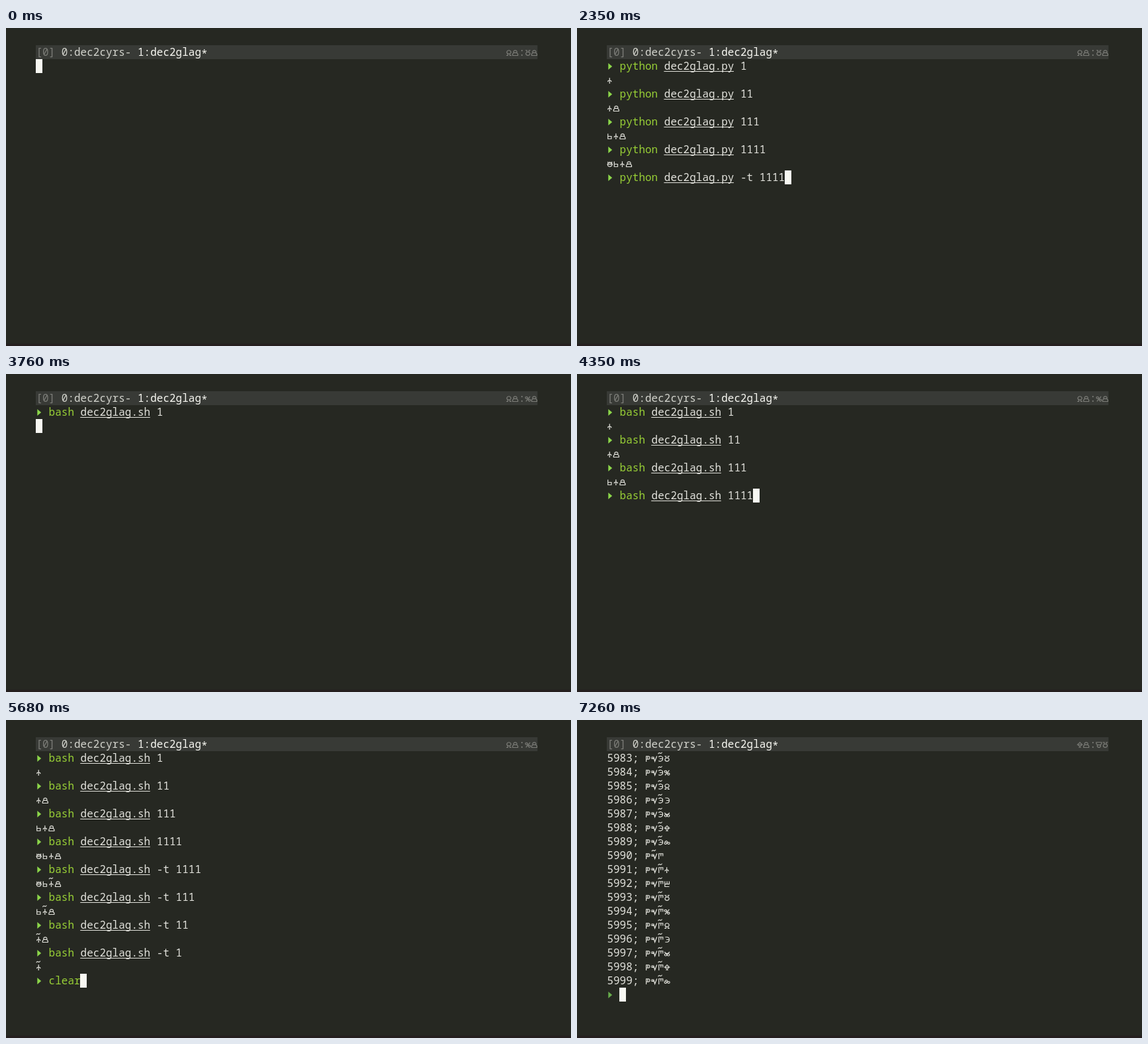
Recreate the animation shown at these times as an HTML page. Size 854x480 px, loop 8.1 s.

```html
<!DOCTYPE html>
<html lang="en">
<head>
<meta charset="utf-8">
<title>dec2glag</title>
<style>
html, body { margin: 0; width: 100%; height: 100%; overflow: hidden; background: #262822; }
svg { display: block; width: 854px; height: 480px; }
text { font: 300 16px "Noto Sans Mono", "Liberation Mono", monospace; white-space: pre; }
</style>
</head>
<body>
<svg id="stage" viewBox="0 0 854 480" xmlns="http://www.w3.org/2000/svg">
  <rect width="854" height="480" fill="#262822"/>
  <rect y="476.5" width="854" height="3.5" fill="#251f1f"/>
  <g id="screen"></g>
</svg>
<script>
const LOOP = 8100, LAST = 87;
const CELL = 9.6, LINE = 21, LEFT = 45, TOP = 26;
const WHITE = '#f8f8f2', TEXT = '#e2e2dc', GREEN = '#98cf36', ARROW = '#8cd64a';
const GREY = '#7c7d78', BACK = '#262822';

const colX = c => LEFT + c * CELL;
const rowY = r => TOP + r * LINE;

// Glagolitic numerals, drawn in an 8 by 9 box
const ring = (x, y, rx, ry = rx) =>
  `M${x - rx} ${y}a${rx} ${ry} 0 1 0 ${2 * rx} 0a${rx} ${ry} 0 1 0 ${-2 * rx} 0`;
const GLYPHS = {
  1: 'M3.6 .3V9M1.2 6.2Q1.2 4 3.6 4T6 6.2',
  2: 'M1 .5V8.5H7M1 4.6H7V.5M4 .5V4.6',
  3: 'M.5 .8H2.6V3.4M5.4 3.4V.8H7.5' + ring(4, 5.8, 2.8, 2.6),
  4: ring(2, 2.7, 1.5) + 'M7 .8L1.2 8.4' + ring(6, 6.6, 1.5),
  5: 'M.5 8.4H2.6V5.8M5.4 5.8V8.4H7.5' + ring(4, 3.4, 2.8, 2.6),
  6: 'M1.5 .8H4Q7 1 7 4.5T4 8.3H1.5M3 4.5H7',
  7: 'M.8 1.8Q1.2 4 4 4.6Q6.8 4 7.2 1.8' + ring(2.2, 6.4, 1.6) + ring(5.8, 6.4, 1.6),
  8: 'M4 0V1.6' + ring(4, 4, 2.6, 2.2) + 'M0 4.2H8M4 6.2V8.2M2.4 8.2H5.6',
  9: ring(1.9, 6, 1.5) + ring(6.2, 6, 1.5) + 'M1 4Q3.5 .5 4.8 4.8M3.4 6H4.7',
  10: 'M2 4.4C-.2-.3 8.2-.3 6 4.4M.4 8.5V6.2L2 4.4H6L7.6 6.2V8.5Z',
  20: 'M2 4.6C-.2 9.6 8.2 9.6 6 4.6M.4 .7V2.8L2 4.6H6L7.6 2.8V.7Z',
  30: 'M.3 8.3Q2 7 2.6 1.5V8L4.6 2.5V8L7.6 1M5 8.3H7.4',
  40: 'M1.5 .5V8.5M1.5 4.5H6.5V.5M4 4.5V8.5',
  50: ring(2, 6.4, 1.6) + ring(6, 6.4, 1.6) + 'M2 4.8V1H6V4.8',
  60: ring(2, 2.4, 1.5) + ring(6, 2.4, 1.5) + ring(4, 6.4, 1.8),
  70: 'M2 9V.8H6.5V4.5H2',
  80: 'M1 1.8Q5-.8 6.7 2.5V6Q5 9.5 1 7.8M2.5 4.5H6.7',
  90: 'M1.5 9V.8H7V4.6M4.3 .8V4.6',
  100: 'M1.3 .5V8.3H6V4.5H1.3',
  200: ring(4, 2.5, 2.3, 2) + 'M4 4.5L1 8.5H7Z',
  300: 'M1 .8H7V4.5H1ZM2.5 4.5V8.5M5.5 4.5V8.5',
  400: ring(2, 5, 1.7) + ring(6, 5, 1.7) + 'M.5 1Q2 3 4 1T7.5 1',
  500: ring(4, 4.5, 3.2, 2.4) + 'M4 0V9',
  600: 'M1 8.3V3.5H7V8.3M4 3.5V.5',
  700: 'M1 1.5Q7-.5 6.8 4.5T1 7.8M4 4.5H6.8',
  800: 'M1 .8V5H7V.8M4 .8V8.8',
  900: 'M.6 4.4V2H3V4.4ZM3 2L4.7 8.3L7.5 .5',
  1000: 'M.2 4.6H7.8M1.4 .8V2.4M4 .8V2.4M6.6 .8V2.4M1 2.4H7' + ring(4, 5.2, 3, 2.9),
  5000: 'M1.6 9V.8H4.6Q6.4 .8 6.4 3T4.6 5.2H1.6M3.6 .8V5.2',
  2000: 'M1 .8V8.3H7V.8M4 .8V8.3',
  3000: ring(2.6, 3, 1.8) + 'M4.4 3V8.3H7V5',
  4000: 'M4 .5L7 8.3H1ZM2.5 4.5H5.5'
};

function numeral(n) {
  const units = n % 10, tens = n % 100 - units;
  const tail = tens === 10 ? [units, tens] : [tens, units];
  return [n - n % 1000, n % 1000 - n % 100, ...tail].filter(v => v);
}

const label = (c, r, s, fill = TEXT, dy = 0) =>
  `<text x="${colX(c) + .4}" y="${rowY(r) + 16 + dy}" fill="${fill}">${s}</text>`;

function glyphs(c, r, n, titlo, color = TEXT) {
  const list = numeral(n);
  let out = list.map((v, i) =>
    `<path transform="translate(${colX(c + i) + .3} ${rowY(r) + 7}) scale(1.1 1)" d="${GLYPHS[v]}"/>`).join('');
  if (titlo) {
    const x = colX(c + Math.max(0, list.length - 2));
    out += `<path d="M${x + .8} ${rowY(r) + 4.2}q1.4-2.4 3-1.2t3-1.2"/>`;
  }
  return `<g fill="none" stroke="${color}" stroke-width="1.1">${out}</g>`;
}

const arrow = (r, fill = ARROW) => `<path d="M47.3 ${rowY(r) + 6}l5.9 5l-5.9 5z" fill="${fill}"/>`;

function cursor(c, r, under = '') {
  return `<rect x="${Math.round(colX(c))}" y="${rowY(r)}" width="10" height="${LINE}" fill="${WHITE}"/>` +
    (under ? label(c, r, under, BACK) : '');
}

function command(r, s) {
  const [word] = s.split(' ');
  const file = s.slice(word.length + 1).split(' ')[0];
  let out = arrow(r) + label(2, r, word, GREEN);
  if (file) {
    const c = 3 + word.length;
    out += label(c, r, s.slice(word.length + 1)) +
      `<path d="M${colX(c)} ${rowY(r) + 18.5}h${file.length * CELL}" stroke="${TEXT}"/>`;
  }
  return out;
}

function status(n) {
  const [h, m] = n < 37 ? [15, 13] : n < 72 ? [15, 14] : [18, 23];
  return `<rect x="${LEFT}" y="${TOP}" width="${79 * CELL}" height="${LINE}" fill="#383a36"/>` +
    label(0, 0, '[0]', GREY) + label(4, 0, '0:dec2cyrs-', '#d2d3cc') +
    label(16, 0, '1:dec2glag', WHITE) + label(26, 0, '*', WHITE, 3) +
    glyphs(74, 0, h, false, GREY) + label(76, 0, ':', GREY) + glyphs(77, 0, m, false, GREY);
}

// One step per tick: finished commands, then the input line.
// "@" command prefix, "#k" first k letters typed, "!" entered, "~" no prompt, "<k" cursor moved back
const ARGS = ['1', '11', '111', '1111', '-t 1111', '-t 111', '-t 11', '-t 1'];
const SESSIONS = [
  { from: 0, pre: 'python dec2glag.py ', args: ARGS, steps: [
    '0~', ...Array.from({ length: 10 }, (_, i) => '0#' + Math.round(i * 20 / 9)),
    '0!', '1~', '1', '1@', '1@1', '1@11', '2@11', '2@111', '3@111', '3@1111', '3!', '4',
    '4@1111', '4@1111<4', '4@1111<4', '4@-1111<4', '4@-t 1111<4', '4@-t 1111', '4!',
    '5', '5@-t 111', '6', '6@-t 11', '7', '7@-t 1', '8', '8c', '8clear'] },
  { from: 40, pre: 'bash dec2glag.sh ', args: ARGS, steps: [
    '0', '0#2', '0#8', '0#15', '0#18', '0!', '1', '1@11', '2', '2@111', '3', '3@111', '3@1111',
    '4', '4@1111', '4@1111<4', '4@-1111<4', '4@-t 1111', '5', '5@-t 1111', '5@-t 111',
    '6', '6@-t 11', '7', '7@-t 1', '8', '8c', '8cle', '8clear'] },
  { from: 72, pre: 'bash dec2glag.sh ', args: ['-t -l'], steps: ['0', '0', '0#2', '0#11', '0#22'] }
];

function shell(n) {
  const { from, pre, args, steps } = SESSIONS.filter(s => s.from <= n).pop();
  const step = steps[Math.min(n - from, steps.length - 1)];
  const done = +step[0], rest = step.slice(1), row = 1 + 2 * done;
  let out = '';
  for (let i = 0; i < done; i++) {
    const titlo = args[i].startsWith('-t');
    out += command(1 + 2 * i, pre + args[i]) + glyphs(0, 2 + 2 * i, +args[i].replace('-t ', ''), titlo);
  }
  if (rest === '~') return out + cursor(0, row);
  if (rest === '!') return out + command(row, pre + args[done]) + cursor(0, row + 1);
  let [text, back = 0] = rest.replace('@', pre).split('<');
  if (text[0] === '#') text = (pre + args[done]).slice(0, +text.slice(1));
  const at = text.length - back;
  return out + command(row, text) + cursor(2 + at, row, text[at]);
}

function listing(n) {
  const ended = n >= 85, open = n === 78;
  const passed = n - 78 - (n > 80 ? 1 : 0);
  const last = ended ? 5999 : n < 78 ? 437 : 1132 + 811 * passed;
  const rows = open ? 18 : 17;
  let out = '';
  for (let r = 1; r <= rows; r++) {
    const v = last - rows + r, s = v + '; ';
    out += label(0, r, s) + glyphs(s.length, r, v, true);
  }
  if (ended) return out + arrow(18, n < LAST ? ARROW : '#68ad4c') + cursor(2, 18);
  return out + cursor(open ? 10 : 0, 18);
}

const screen = document.getElementById('screen');
let shown = -1;

function draw(ms) {
  const t = Math.floor(ms % LOOP / 10) * 10;
  const n = Math.max(0, Math.min(LAST, Math.ceil((3 * t - 20) / 250) - 1));
  if (n === shown) return;
  shown = n;
  screen.innerHTML = status(n) + (n < 77 ? shell(n) : listing(n));
}

const start = performance.now();
function tick() {
  draw(performance.now() - start);
  requestAnimationFrame(tick);
}
tick();
</script>
</body>
</html>
```
